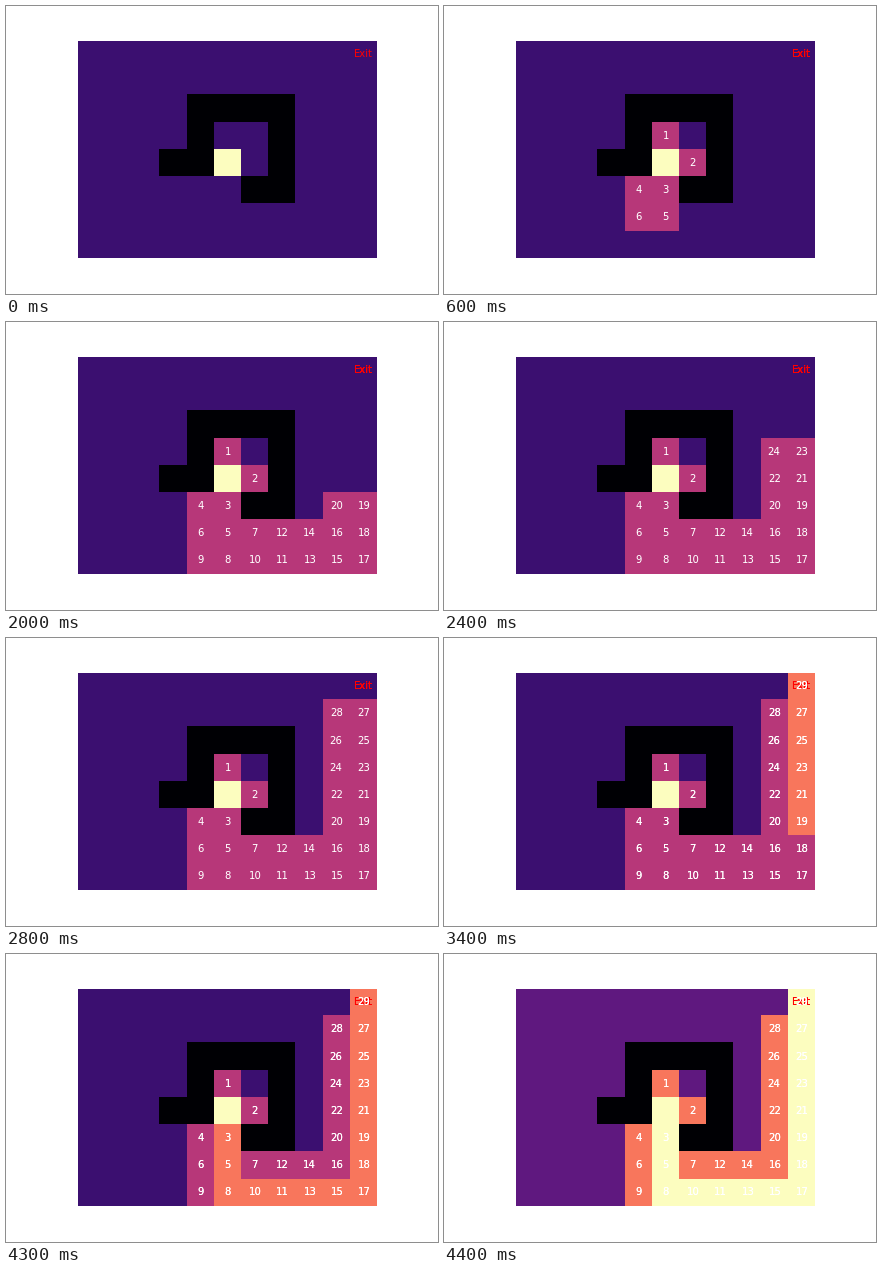
Recreate the animation shown at these times as an HTML page. Size 432 by 288 pixels, loop 4.5 s.

```html
<!DOCTYPE html>
<html lang="en">
<head>
<meta charset="utf-8">
<title>Maze search</title>
<style>
  html, body { margin: 0; width: 100%; height: 100%; overflow: hidden; background: #fff; }
  svg { display: block; width: 432px; height: 288px; }
  rect { shape-rendering: crispEdges; }
  text { font: 10px "DejaVu Sans", sans-serif; fill: #fff; }
  .exit { fill: #f00; }
</style>
</head>
<body>
<svg id="stage" viewBox="0 0 432 288"></svg>
<script>
const STEP = 100, CELL = 27.18, LEFT = 71.91, TOP = 34.56;

// # wall, S start, E exit
const maze = [
  "..........E",
  "...........",
  "....####...",
  "....#..#...",
  "...##S.#...",
  "......##...",
  "...........",
  "..........."
];

const searching = { wall: "#000004", free: "#3b0f70", visited: "#b73779", route: "#f8765c", start: "#fcfdbf" };
const solved = { wall: "#000004", free: "#5f187f", visited: "#f8765c", route: "#fcfdbf" };

const stage = document.getElementById("stage");
const labels = [];
const xEdge = c => Math.round(LEFT + c * CELL);
// Rows are sampled slightly taller and clipped at the top edge
const yEdge = r => Math.max(35, Math.round(33.95 + r * 27.25));

function add(tag, attrs, content = "") {
  const el = document.createElementNS("http://www.w3.org/2000/svg", tag);
  for (const key in attrs) el.setAttribute(key, attrs[key]);
  el.textContent = content;
  stage.append(el);
  return el;
}

const grid = maze.map((line, r) => [...line].map((mark, c) => {
  const x = xEdge(c), y = yEdge(r);
  const el = add("rect", { x, y, width: xEdge(c + 1) - x, height: yEdge(r + 1) - y });
  return { r, c, mark, el, seen: Infinity, back: Infinity };
}));
const cells = grid.flat();
const start = cells.find(cell => cell.mark === "S");
const exit = cells.find(cell => cell.mark === "E");

// Depth-first search: left, up, right, down
const visits = [];
const stack = [start];
start.seen = 0;
while (exit.seen === Infinity) {
  const { r, c } = stack.pop();
  for (const [dr, dc] of [[0, -1], [-1, 0], [0, 1], [1, 0]]) {
    const next = grid[r + dr]?.[c + dc];
    if (!next || next.mark === "#" || next.seen < Infinity) continue;
    next.parent = grid[r][c];
    next.seen = visits.push(next);
    stack.push(next);
  }
}

// The route is traced back from the exit, one cell per step
const found = exit.seen;
let last = found;
for (let cell = exit; cell; cell = cell.parent) cell.back = last++;
const steps = last;

// Labels are centred by their ink and snapped to whole pixels
const pen = document.createElement("canvas").getContext("2d");
pen.font = '100px "DejaVu Sans", sans-serif';

function addLabel(from, { r, c }, content, cls = "") {
  const ink = pen.measureText(content);
  const inkLeft = -ink.actualBoundingBoxLeft / 10;
  const inkWidth = ink.actualBoundingBoxRight / 10 - inkLeft;
  const x = Math.round(LEFT + (c + 0.5) * CELL - inkWidth / 2 + 0.1) - Math.floor(inkLeft - 0.1);
  const y = Math.round(TOP + (r + 0.5) * CELL + 3);
  const attrs = { x, y, class: cls };
  if (content.length > 1) attrs.dx = "0 -1";
  labels.push({ from, el: add("text", attrs, content) });
}

// Repeated labels thicken the antialiased edges
for (let i = 0; i < 4; i++) addLabel(i, exit, "Exit", "exit");
for (const cell of visits) {
  addLabel(cell.seen, cell, String(cell.seen));
  addLabel(found + 1, cell, String(cell.seen));
}

function kind(cell, step) {
  if (cell.mark === "#") return "wall";
  if (step >= cell.back) return "route";
  if (cell === start) return "start";
  return step >= cell.seen ? "visited" : "free";
}

let shown = -1;
function draw(step) {
  if (step === shown) return;
  shown = step;
  const colors = step === steps - 1 ? solved : searching;
  for (const cell of cells) cell.el.setAttribute("fill", colors[kind(cell, step)]);
  for (const { from, el } of labels) el.style.display = step >= from ? "" : "none";
}

const t0 = performance.now();
function tick() {
  draw(Math.floor((performance.now() - t0) / STEP) % steps);
  requestAnimationFrame(tick);
}
draw(0);
requestAnimationFrame(tick);
</script>
</body>
</html>
```
